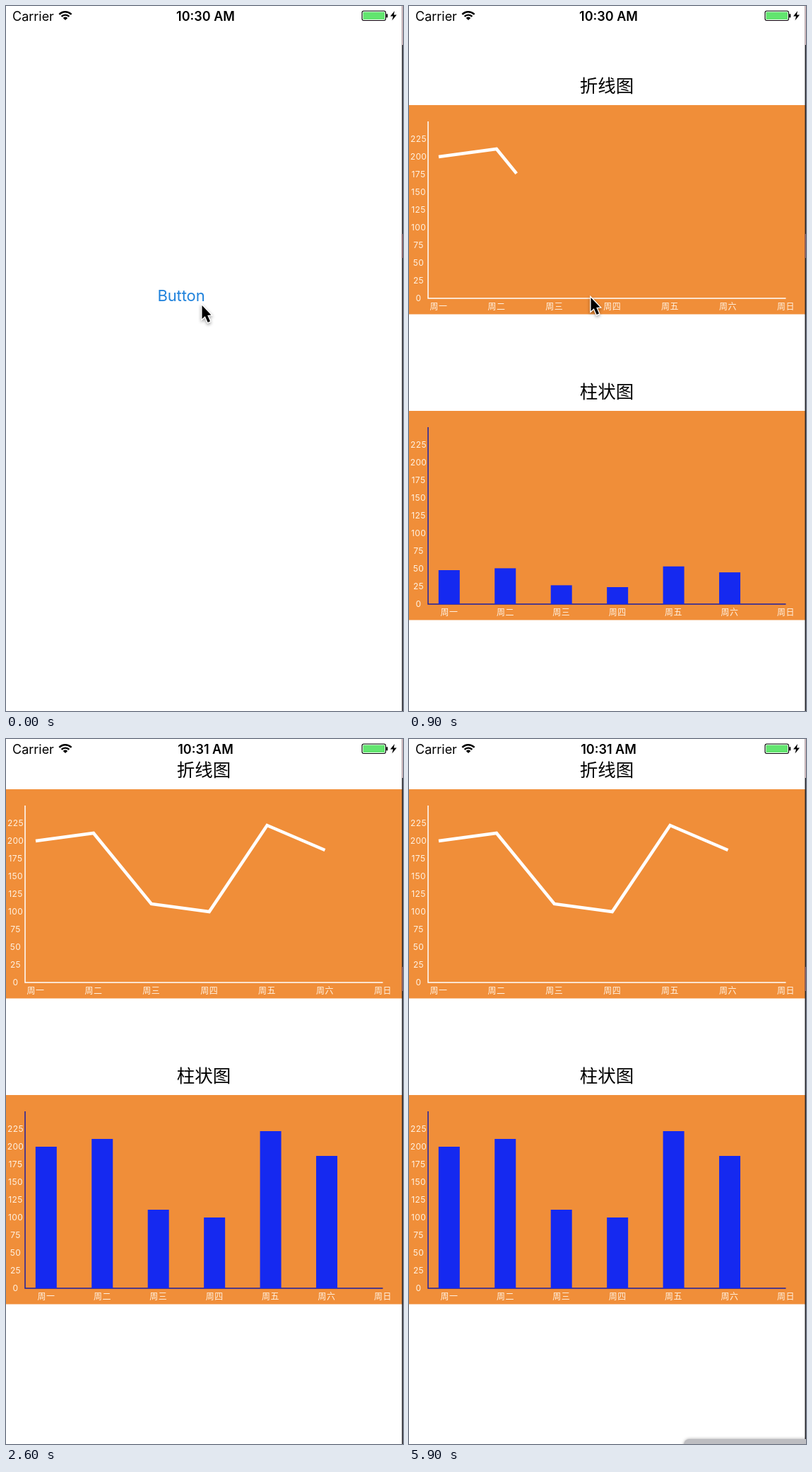
Animation, 562 px wide and 996 px high, one loop 6 s. Source, as an HTML page with a canvas:

```html
<!DOCTYPE html>
<html lang="zh-CN">
<head>
<meta charset="utf-8">
<title>Charts</title>
<style>
  html, body { margin: 0; width: 100%; height: 100%; overflow: hidden; background: #fff; }
  canvas { display: block; }
</style>
</head>
<body>
<canvas width="562" height="996"></canvas>
<script>
const W = 562, H = 996, LOOP = 6000, STEP = 100;
const ctx = document.querySelector('canvas').getContext('2d');
const LATIN = 'Inter, sans-serif';
const HAN = '"Noto Sans CJK SC", "Noto Sans CJK", sans-serif';
const ORANGE = '#f08e39', BLUE = '#1529f0', LABEL = '#fff3e4';
const VALUES = [200, 211, 111, 100, 222, 187];
const DAYS = [...'一二三四五六日'].map(d => '周' + d);
const CURSOR = [
  [0, 277, 423], [400, 257, 412], [1500, 257, 412], [1700, 257, 418],
  [2000, 274, 450], [2500, 430, 946], [2600, 450, 1010], [LOOP, 450, 1010]
];

const clamp = v => Math.max(0, Math.min(1, v));

function rect(x, y, w, h, color) {
  ctx.fillStyle = color;
  ctx.fillRect(x, y, w, h);
}

function path(points, close) {
  ctx.beginPath();
  points.forEach(([x, y]) => ctx.lineTo(x, y));
  if (close) ctx.closePath();
}

function stroke(color, width) {
  ctx.strokeStyle = color;
  ctx.lineWidth = width;
  ctx.stroke();
}

// y is the vertical middle of the capitals
function text(str, x, y, size, { color = '#000', font = LATIN, weight = 400, align = 'center', gap = 0 } = {}) {
  ctx.font = `${weight} ${size}px ${font}`;
  ctx.letterSpacing = gap + 'px';
  ctx.textAlign = align;
  ctx.fillStyle = color;
  ctx.fillText(str, x, y + size * 0.37);
}

function statusBar(t) {
  text('Carrier', 9, 14, 18, { align: 'left' });
  text(t < 1100 ? '10:30 AM' : '10:31 AM', 282.5, 14, 18, { weight: 600 });

  for (const r of [11.8, 7.4]) {
    ctx.beginPath();
    ctx.arc(84, 20, r, -Math.PI * 0.76, -Math.PI * 0.24);
    stroke('#000', 2.4);
  }
  ctx.fillStyle = '#000';
  ctx.beginPath();
  ctx.moveTo(84, 20);
  ctx.arc(84, 20, 4.4, -Math.PI * 0.76, -Math.PI * 0.24);
  ctx.fill();

  ctx.beginPath();
  ctx.roundRect(504, 7, 33.5, 13.5, 2.5);
  stroke('#000', 1.1);
  rect(505.5, 8.5, 30.5, 10.5, '#62e56f');
  rect(538.3, 11.3, 2, 5, '#000');
  path([[550, 7], [544, 14.5], [548, 14.5], [546.5, 20.5], [553, 12.5], [549, 12.5]], true);
  ctx.fill();
}

function chartFrame(title, top, axisColor, dayX, dayStep) {
  const base = top + 273;
  text(title, 280, top - 27, 25.5, { font: HAN });
  rect(0, top, W, 295.5, ORANGE);
  path([[27, top + 23], [27, base], [533.5, base]]);
  stroke(axisColor, 1.5);
  for (let v = 0; v <= 225; v += 25)
    text(v, 13.5, base - v, 12, { color: LABEL, gap: 0.4 });
  DAYS.forEach((day, i) =>
    text(day, dayX + i * dayStep, base + 12, 12, { color: LABEL, font: HAN, gap: 0.5 }));
  return base;
}

function lineChart(progress) {
  const base = chartFrame('折线图', 71, '#fff', 42, 81.9);
  const points = VALUES.map((v, i) => [42 + i * 81.9, base - v]);
  const length = points.slice(1).reduce((sum, [x, y], i) =>
    sum + Math.hypot(x - points[i][0], y - points[i][1]), 0);
  path(points);
  ctx.setLineDash([length * progress, length * 2]);
  stroke('#fff', 4.5);
  ctx.setLineDash([]);
}

function barChart(progress) {
  const base = chartFrame('柱状图', 503, '#1c1fa0', 57, 79.4);
  VALUES.forEach((v, i) =>
    rect(41.8 + i * 79.45, base - v * progress, 30, v * progress, BLUE));
}

function sheet(t) {
  const s = Math.max(0, t - 642.5) * 0.01686;
  const offset = H * (1 + s) * Math.exp(-s); // critically damped spring
  const progress = clamp((t - 660) / 1000);
  ctx.save();
  ctx.translate(0, Math.floor(offset));
  rect(0, 0, W, H, '#fff');
  lineChart(progress);
  barChart(progress);
  ctx.restore();
}

function screenEdge() {
  rect(560.5, 0, 1.5, H, '#25252a');
  rect(560.5, 0, 1.5, 55, '#d9bfc4');
  rect(560.5, 322, 1.5, 34, '#8a6068');
}

function cursor(t) {
  const i = CURSOR.findIndex(k => k[0] > t);
  const [t0, x0, y0] = CURSOR[i - 1], [t1, x1, y1] = CURSOR[i];
  const k = (t - t0) / (t1 - t0);
  ctx.save();
  ctx.translate(x0 + (x1 - x0) * k, y0 + (y1 - y0) * k);
  path([[0.5, 0], [0.5, 19], [4.8, 15.2], [8.7, 24], [12, 22.6], [8.2, 14], [13.4, 13.4]], true);
  ctx.shadowColor = 'rgba(0,0,0,.4)';
  ctx.shadowBlur = 4;
  ctx.shadowOffsetY = 2;
  stroke('#fff', 2.6);
  ctx.shadowColor = 'transparent';
  ctx.fillStyle = '#000';
  ctx.fill();
  ctx.restore();
}

function bottomPanel(t) {
  const rise = 8 * clamp((t - 5400) / 300);
  if (!rise) return;
  ctx.save();
  ctx.shadowColor = 'rgba(0,0,0,.35)';
  ctx.shadowBlur = 4;
  ctx.fillStyle = '#bdbdc1';
  ctx.beginPath();
  ctx.roundRect(389, H - rise + 1, 200, 40, 8);
  ctx.fill();
  ctx.restore();
}

function draw(t) {
  rect(0, 0, W, H, '#fff');
  text('Button', 248, 409, 22, { color: t < 700 ? '#1f82dc' : '#a9d0f3', gap: -0.1 });
  if (t >= 700) sheet(t);
  statusBar(t);
  screenEdge();
  cursor(t);
  bottomPanel(t);
}

function tick() {
  const t = performance.now() % LOOP;
  draw(Math.floor(t / STEP) * STEP);
  requestAnimationFrame(tick);
}
tick();
</script>
</body>
</html>
```
